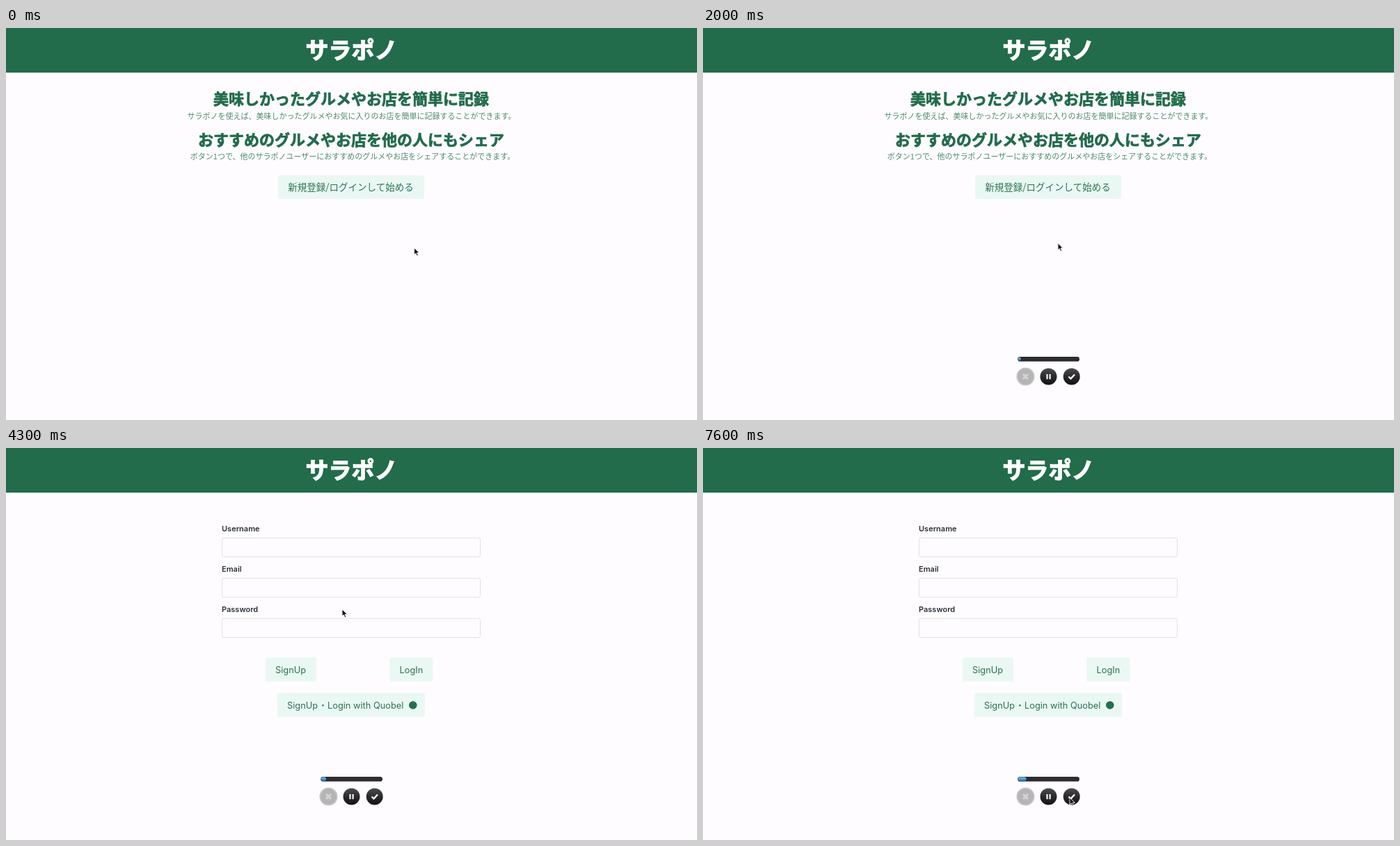
These frames come from a looping animation (993 px wide and 564 px high, 7.7 s). An HTML page:

```html
<!DOCTYPE html>
<html lang="ja">
<head>
<meta charset="utf-8">
<title>サラポノ</title>
<style>
  html, body { margin: 0; width: 100%; height: 100%; overflow: hidden; background: #fefcfe; }
  svg { display: block; width: 100vw; height: 100vh; }
  text { font-family: Inter, "Noto Sans CJK JP", "Noto Sans CJK", sans-serif; fill: #2b7352; }
  .jp text, text.jp { font-family: "Noto Sans CJK JP", "Noto Sans CJK", sans-serif; text-anchor: middle; }
  .title { font-size: 33px; font-weight: 900; fill: #fff; stroke: #fff; stroke-width: 1.3; }
  .head { font-size: 22px; font-weight: 700; fill: #216b4a; stroke: #216b4a; stroke-width: .7; }
  .note { font-size: 11px; fill: #4d8a6e; }
  .label { font-size: 11px; font-weight: 600; fill: #2b3038; }
  .link { font-size: 12.8px; }
  .btn { fill: #eaf8f3; }
  .btn.hover { fill: #d8f2e5; }
  .input { fill: none; stroke: #dfe2e8; }
</style>
</head>
<body>
<svg viewBox="0 0 993 564">
  <defs>
    <linearGradient id="knob" x2="0" y2="1">
      <stop offset="0" stop-color="#4c4c4e"/>
      <stop offset=".5" stop-color="#2b2b2d"/>
      <stop offset="1" stop-color="#121214"/>
    </linearGradient>
    <linearGradient id="blue" x2="0" y2="1">
      <stop offset="0" stop-color="#6dbcf0"/>
      <stop offset="1" stop-color="#1f78c0"/>
    </linearGradient>
  </defs>
  <rect width="993" height="64.2" fill="#226b4b"/>
  <text class="jp title" x="496.5" y="43.5">サラポノ</text>

  <g id="home" class="jp">
    <text class="head" x="496" y="110.3">美味しかったグルメやお店を簡単に記録</text>
    <text class="note" x="496.5" y="130.5">サラポノを使えば、美味しかったグルメやお気に入りのお店を簡単に記録することができます。</text>
    <text class="head" x="496" y="169">おすすめのグルメやお店を他の人にもシェア</text>
    <text class="note" x="498" y="189.2">ボタン1つで、他のサラポノユーザーにおすすめのグルメやお店をシェアすることができます。</text>
    <rect class="btn" x="391" y="212" width="210" height="34" rx="2"/>
    <text x="495.5" y="234.4" style="font-size:13.5px">新規登録/ログインして始める</text>
  </g>

  <g id="form">
    <text class="label" x="310" y="119.5">Username</text>
    <text class="label" x="310" y="177.5">Email</text>
    <text class="label" x="310" y="235.5">Password</text>
    <rect class="input" x="310.5" y="129.3" width="371" height="27.4" rx="2.5"/>
    <rect class="input" x="310.5" y="187.3" width="371" height="27.4" rx="2.5"/>
    <rect class="input" x="310.5" y="245.2" width="371" height="27.4" rx="2.5"/>
    <rect class="btn" x="373" y="301.5" width="73" height="34.5" rx="2"/>
    <rect class="btn" x="551.5" y="301.5" width="62" height="34.5" rx="2"/>
    <rect class="btn" x="390" y="352.5" width="212" height="34.5" rx="2"/>
    <g class="link">
      <text x="387" y="324">SignUp</text>
      <text x="565.5" y="324">LogIn</text>
      <text x="404" y="375">SignUp</text>
      <text class="jp" x="455.5" y="375">・</text>
      <text x="462" y="375">Login with Quobel</text>
    </g>
    <circle cx="584.8" cy="370" r="5.8" fill="#23704e"/>
  </g>

  <g id="controls">
    <rect x="452.3" y="472.9" width="88.7" height="6.9" rx="3.4" fill="#2d2d30"/>
    <rect id="bar" x="453" y="473.6" height="5.4" rx="2.7" fill="url(#blue)"/>
    <circle cx="463.5" cy="501.5" r="12.3" fill="#b5b5b5" stroke="#c9c9c9" stroke-width="1.6"/>
    <path d="M460 498l7 7m0-7l-7 7" stroke="#d3d3d3" stroke-width="3"/>
    <circle cx="496.5" cy="501.5" r="12" fill="url(#knob)"/>
    <path d="M494.5 498v7.2m4.1-7.2v7.2" stroke="#fff" stroke-width="2.1"/>
    <circle cx="529.7" cy="501.5" r="12" fill="url(#knob)"/>
    <path d="M525.5 501.6l3 3 5.5-6" fill="none" stroke="#fff" stroke-width="2.3"/>
  </g>

  <g id="pointer">
    <path id="arrow" d="M0 0v10l2.3-2.1 1.7 3.9 1.8-.8-1.7-3.7h3.2z" fill="#111" stroke="#fff" stroke-width=".9"/>
    <path id="hand" d="M-.8 1q1-1.5 2 0v3l4 .8q1.5.4 1.2 2l-.8 3.2-.8 1.5h-4.6l-3.4-4.4q.4-1.4 2.4.3z" fill="#fff" stroke="#333" stroke-width=".9"/>
    <path id="beam" d="M-2-5.3q2 0 2 1.3V4q0 1.3-2 1.3M2-5.3q-2 0-2 1.3V4q0 1.3 2 1.3M-1.2.9h2.4" fill="none" stroke="#444" stroke-width="1"/>
  </g>
</svg>
<script>
const LOOP = 7700, STEP = 100, SWITCH = 3800, WAKE = 4900;
const $ = id => document.getElementById(id);
const show = (id, on) => $(id).setAttribute('display', on ? 'inline' : 'none');

// Pointer stops: time, x, y
const stops = [
  [0, 586.6, 316.3], [100, 586.6, 316.3], [800, 510, 309.5], [2500, 510, 309.5],
  [3200, 483, 232], [WAKE, 483, 232], [5300, 482.5, 260],
  [5400, 482.5, 260], [6100, 527, 503], [LOOP, 527, 503]
];

function pointerAt(t) {
  const i = stops.findIndex(s => s[0] > t);
  const [t0, x0, y0] = stops[i - 1], [t1, x1, y1] = stops[i];
  const p = (t - t0) / (t1 - t0), e = p * p * (3 - 2 * p);
  return [x0 + (x1 - x0) * e, y0 + (y1 - y0) * e];
}

function inside(rect, x, y) {
  const left = rect.x.baseVal.value, top = rect.y.baseVal.value;
  return x >= left && x <= left + rect.width.baseVal.value &&
         y >= top && y <= top + rect.height.baseVal.value;
}

function draw(now) {
  const t = Math.floor(now % LOOP / STEP) * STEP;
  const page = t < SWITCH ? 'home' : 'form';
  const [x, y] = pointerAt(t);
  let cursor = 'arrow';

  for (const rect of $(page).querySelectorAll('rect')) {
    const over = inside(rect, x, y);
    const isButton = rect.classList.contains('btn');
    if (isButton) rect.classList.toggle('hover', over);
    if (over) cursor = isButton ? 'hand' : 'beam';
  }

  show('home', page === 'home');
  show('form', page === 'form');
  show('controls', t >= 100);
  $('bar').setAttribute('width', 1 + t * 0.0014);
  for (const id of ['arrow', 'hand', 'beam']) show(id, id === cursor);
  $('pointer').setAttribute('transform', `translate(${x} ${y})`);
}

const start = performance.now();
function tick() {
  draw(performance.now() - start);
  requestAnimationFrame(tick);
}
tick();
</script>
</body>
</html>
```
